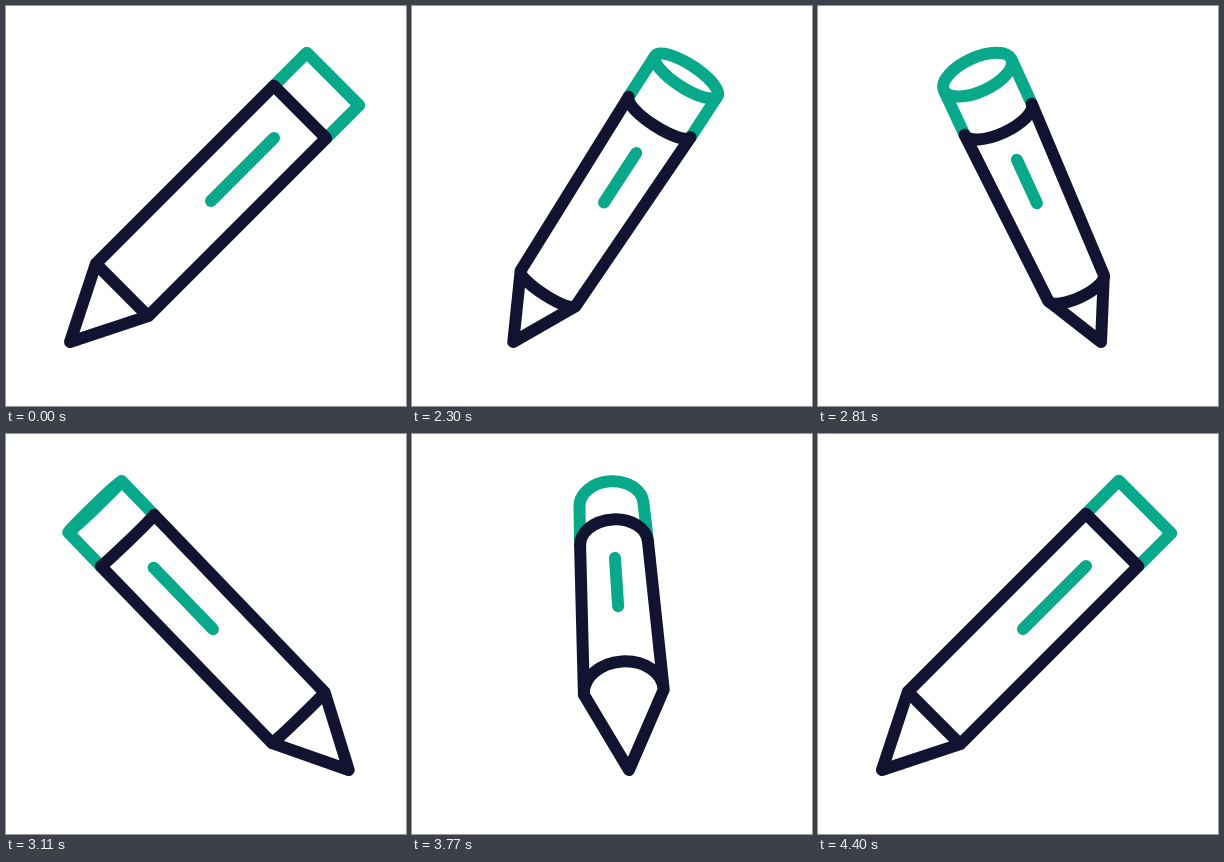
Animation, 400 px wide and 400 px high, one loop 4430 ms. Source, as an HTML page:

```html
<!DOCTYPE html>
<html lang="en">
<head>
<meta charset="utf-8">
<title>Turning pencil</title>
<style>
  html, body { margin: 0; width: 100%; height: 100%; overflow: hidden; background: #fff; }
  svg { display: block; width: 100%; height: 100%; }
  path { fill: none; stroke-width: 12; stroke-linecap: round; stroke-linejoin: round; }
  .accent { stroke: #08a88a; }
  .ink { stroke: #121331; }
</style>
</head>
<body>
<svg viewBox="0 0 400 400">
  <path id="cap" class="accent"/>
  <path id="shine" class="accent"/>
  <path id="body" class="ink"/>
</svg>
<script>
const LOOP = 4430, START = 2030, STEP = 30, TURN = 80;
const TIP_Y = 336, MID = { x: 205, y: 195 };

// Each value: [side view, change with the top facing us, change with the tip facing us]
const RINGS = {
  base:   { y: [284, -3, -26], r: [37, -8.7, 3], bulge: [0, 14.5, 31] },
  collar: { y: [106, 10, 4],   r: [37, 0, -3],   bulge: [0, 20, 25] },
  top:    { y: [73, -6, -2],   r: [37, 0.3, -5], bulge: [0, 23.5, 24] }
};
const SHINE = [[132, 30, -8], [195, 3, -23]];

const [cap, shine, body] = ['cap', 'shine', 'body'].map(id => document.getElementById(id));
const pt = (x, y) => x.toFixed(2) + ' ' + y.toFixed(2);

function draw(angle) {
  const c = Math.cos(angle), s = Math.sin(angle), k = s * s;
  const topFaces = s > 0;
  const mix = v => v[0] + k * v[topFaces ? 1 : 2];

  // The pencil's axis is a straight line on the screen
  const slope = c * (1 - 0.16 * k);
  const midX = MID.x - 34 * c * k;
  const onAxis = y => midX + slope * (MID.y - y);
  const axisPt = y => pt(onAxis(y), y);
  const norm = Math.hypot(1, slope);
  const tilt = Math.atan(slope) * 180 / Math.PI;

  const ring = ({ y, r, bulge }) => {
    const cy = mix(y), cx = onAxis(cy), rad = mix(r);
    const dx = rad / norm, dy = dx * slope;
    const left = pt(cx - dx, cy - dy), right = pt(cx + dx, cy + dy);
    const arc = (sweep, end) =>
      `A${rad.toFixed(2)} ${mix(bulge).toFixed(2)} ${tilt.toFixed(2)} 0 ${sweep} ${end}`;
    return { left, right, arc, front: `M${left}` + arc(topFaces ? 0 : 1, right) };
  };

  const base = ring(RINGS.base), collar = ring(RINGS.collar), top = ring(RINGS.top);

  cap.setAttribute('d', `M${collar.left}L${top.left}${top.arc(1, top.right)}L${collar.right}` +
    (topFaces ? top.front : ''));
  shine.setAttribute('d', 'M' + SHINE.map(v => axisPt(mix(v))).join('L'));
  body.setAttribute('d', collar.front + base.front +
    `M${collar.left}L${base.left}L${axisPt(TIP_Y)}L${base.right}L${collar.right}`);
}

function angleAt(t) {
  if (t < START) return 0;
  const step = Math.min(TURN, 1 + Math.floor((t - START) / STEP));
  return step % TURN / TURN * 2 * Math.PI;
}

const begin = performance.now();
function tick(now) {
  draw(angleAt(Math.max(0, now - begin) % LOOP));
  requestAnimationFrame(tick);
}
draw(0);
requestAnimationFrame(tick);
</script>
</body>
</html>
```
